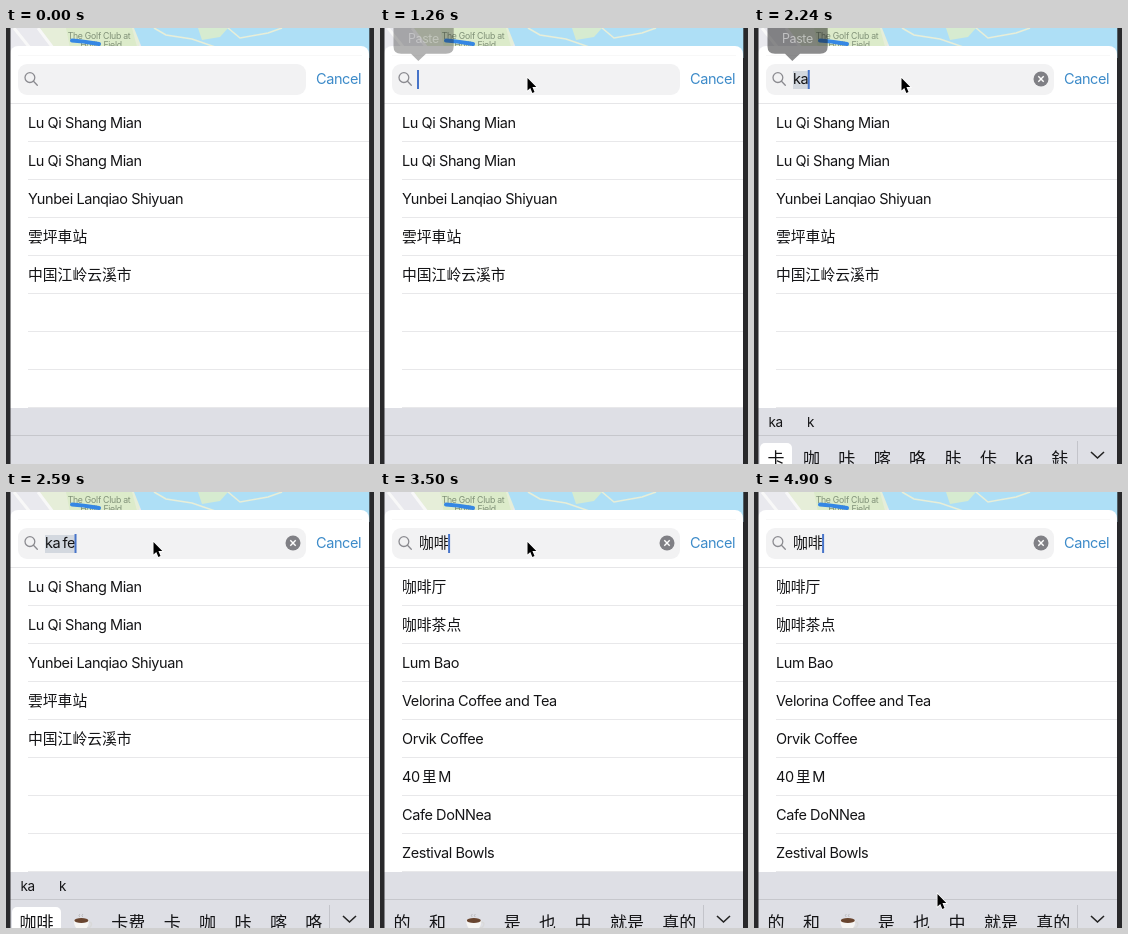
Recreate the animation shown at these times as an HTML page with a canvas. Size 368 by 436 pixels, loop 4970 ms.

```html
<!DOCTYPE html>
<html lang="zh">
<head>
<meta charset="utf-8">
<style>
  html, body { margin: 0; width: 368px; height: 436px; overflow: hidden; background: #fff; }
  canvas { display: block; }
</style>
</head>
<body>
<canvas id="stage" width="368" height="436"></canvas>
<script>
const g = document.getElementById('stage').getContext('2d');
const LOOP = 4970, STEP = 70;
const FONT = 'Inter, "Noto Sans CJK SC", "Noto Sans CJK", sans-serif';

const RECENT = ['Lu Qi Shang Mian', 'Lu Qi Shang Mian', 'Yunbei Lanqiao Shiyuan', '雲坪車站', '中国江岭云溪市'];
const RESULTS = ['咖啡厅', '咖啡茶点', 'Lum Bao', 'Velorina Coffee and Tea', 'Orvik Coffee',
  '40\u2009里\u2009M', 'Cafe DoNNea', 'Zestival Bowls'];

// [start, text, candidates]
const TYPING = [
  [0, '', ''],
  [2030, 'k', '看 可 开 快 卡 块 刻 k 靠'],
  [2170, 'ka', '卡 咖 咔 喀 咯 胩 佧 ka 鉲'],
  [2450, 'ka\u2009f', '咖啡 ☕ 卡 咖 咔 喀 咯 胩'],
  [2590, 'ka\u2009fe', '咖啡 ☕ 卡费 卡 咖 咔 喀 咯'],
  [2730, 'ka\u2009fei', '咖啡 ☕ 卡费 卡 咖 咔 喀 咯'],
  [3360, '咖啡', '的 和 ☕ 是 也 中 就是 真的']
];
const COMMIT = 3360, SHOW_RESULTS = 3500;

const POINTER_X = [[70, 178], [560, 160], [700, 156], [1050, 147], [4480, 147], [4900, 183]];
const POINTER_Y = [[70, 278], [560, 104], [700, 77], [910, 56], [1050, 50],
  [4480, 50], [4550, 72], [4690, 205], [4830, 378], [4900, 402]];
const CARET = [[0, 0], [140, 1], [700, 1], [840, 0], [1050, 0], [1190, 1], [1680, 1], [1820, 0],
  [1960, 0], [2030, 1], [3850, 1], [4060, 0], [4270, 0], [4410, 1]];
const PASTE = [[1190, 0], [1400, 1], [2170, 1], [2310, 0]];

function at(keys, t) {
  if (t <= keys[0][0]) return keys[0][1];
  for (let i = 1; i < keys.length; i++) {
    const [t0, a] = keys[i - 1], [t1, b] = keys[i];
    if (t <= t1) return a + (b - a) * (t - t0) / (t1 - t0);
  }
  return keys[keys.length - 1][1];
}

function rect(x, y, w, h, color, r = 0) {
  g.fillStyle = color;
  g.beginPath();
  g.roundRect(x, y, w, h, r);
  g.fill();
}

function line(path, color, width = 1) {
  g.strokeStyle = color;
  g.lineWidth = width;
  g.stroke(new Path2D(path));
}

function shape(path, color) {
  g.fillStyle = color;
  g.fill(new Path2D(path));
}

function setFont(text, size) {
  const cjk = text.charCodeAt(0) > 0x2e80;
  g.font = `${cjk ? size + 0.3 : size}px ${FONT}`;
  g.letterSpacing = cjk ? '0px' : `${-0.029 * size}px`;
}

function label(text, x, y, size = 14.5, color = '#141416') {
  setFont(text, size);
  g.fillStyle = color;
  g.fillText(text, x, y);
}

function drawMap() {
  rect(0, 0, 368, 30, '#e9e9ee');
  shape('M34 0H140L128 30H50Z', '#e6eed9');
  shape('M60 0H126L134 30H66Z', '#dcebca');
  line('M8 0L24 20M32 0L50 24', '#f8f8f8', 3);
  shape('M128 0H368V30H140Z', '#aedff6');
  shape('M192 0H222L214 9L196 12Z', '#d6ebd0');
  line('M148 0L160 7L186 11L212 20M222 0L234 10L262 5L276 0', '#e8eed8', 1.6);
  g.textAlign = 'center';
  label('The Golf Club at', 93, 10.5, 8.7, '#7f9077');
  label('Hollis Field', 95, 19.5, 8.7, '#7f9077');
  g.textAlign = 'left';
  g.lineCap = 'round';
  line('M66 12.5Q76 13 93 16', '#3587e4', 4);
  g.lineCap = 'butt';
}

function drawSearch(text, marked, caret) {
  rect(12, 36, 288, 31, '#f2f2f3', 9);
  g.lineCap = 'round';
  line('M28.8 49.6A4.9 4.9 0 1 1 19 49.6A4.9 4.9 0 1 1 28.8 49.6M27.5 53.3L31.3 57.2', '#8b8b90', 1.3);
  g.lineCap = 'butt';
  label('Cancel', 310, 55.5, 14.5, '#3d8bc9');
  setFont(text || 'k', 14.5);
  const width = g.measureText(text).width;
  if (marked) rect(39, 43, width, 18, '#d3d8df');
  label(text, 39, 55.5);
  if (text) {
    rect(279.5, 43.5, 15, 15, '#808085', 7.5);
    line('M284.3 48.3L289.7 53.7M289.7 48.3L284.3 53.7', '#fff', 1.4);
  }
  g.globalAlpha = caret;
  rect(text ? 38.5 + width : 37, 42, 2, 19, '#4774c9');
  g.globalAlpha = 1;
}

function drawList(rows) {
  line('M4 75.5H363', '#e6e6e8');
  for (let i = 0; i < 8; i++) {
    const y = 75.5 + 38 * i;
    if (rows[i]) label(rows[i], 22, y + 24.2);
    line(`M22 ${y + 38}H363`, '#e8e8ea');
  }
}

function drawCup(x) {
  line(`M${x + 16} 430q5 0 3 4q-1 2 -4 2`, '#d9d9d9', 1.5);
  shape(`M${x + 2} 428h15q0 10 -7.5 10t-7.5 -10Z`, '#f6f5f3');
  g.fillStyle = '#69452f';
  g.beginPath();
  g.ellipse(x + 9.5, 428.5, 7, 2.4, 0, 0, 7);
  g.fill();
  line(`M${x + 8} 425q-2 -1 0 -3M${x + 11} 425q-2 -1 0 -3`, '#bdbdc1');
}

function drawKeyboard(candidates, marked) {
  rect(4, 380, 359, 56, '#dedfe5');
  line('M4 407.5H363', '#c6c7cc');
  if (!candidates) return;
  if (marked) {
    label('ka', 14.5, 399, 13.5);
    label('k', 53, 399, 13.5);
  }
  let x = 13.5;
  candidates.split(' ').forEach((word, i) => {
    setFont(word, 16.7);
    const width = word === '☕' ? 21 : g.measureText(word).width;
    if (marked && i === 0) rect(x - 7.5, 415, width + 15, 30, '#fff', 5);
    if (word === '☕') drawCup(x);
    else label(word, x, 437, 16.7);
    x += width + 18.4;
  });
  line('M323.5 413V436', '#c3c4ca');
  line('M337 424L343.5 430L350 424', '#222', 1.6);
}

function drawPaste(alpha) {
  g.globalAlpha = alpha;
  shape('M13.5 0H73.7V18.5Q73.7 25.7 66 25.7H46L38.3 33L31 25.7H21Q13.5 25.7 13.5 18.5Z', '#1b1b1d');
  g.textAlign = 'center';
  label('Paste', 43.4, 15.2, 12.4, '#fff');
  g.textAlign = 'left';
  g.globalAlpha = 1;
}

function drawPointer(x, y) {
  g.save();
  g.translate(x + 0.5, y);
  g.scale(0.9, 0.93);
  const arrow = 'M0 0V13.5L3.1 10.7L5.4 16L7.8 15L5.5 9.8H9.8Z';
  line(arrow, '#fff', 1.6);
  shape(arrow, '#000');
  g.restore();
}

function draw(t) {
  const [, text, candidates] = TYPING.filter(s => s[0] <= t).pop();
  const marked = text !== '' && t < COMMIT;
  drawMap();
  rect(4, 18, 359, 420, '#fff', [8, 8, 0, 0]);
  line('M12 27.5H356', '#f8f8f8');
  drawSearch(text, marked, at(CARET, t));
  drawList(t < SHOW_RESULTS ? RECENT : RESULTS);
  drawKeyboard(candidates, marked);
  drawPaste(at(PASTE, t));
  rect(0, 0, 4.5, 436, '#29292b');
  rect(363.3, 0, 5, 436, '#29292b');
  if (t >= STEP) drawPointer(at(POINTER_X, t), at(POINTER_Y, t));
}

const start = performance.now();
function tick() {
  const t = (performance.now() - start) % LOOP;
  draw(Math.floor(t / STEP) * STEP);
  requestAnimationFrame(tick);
}
tick();
</script>
</body>
</html>
```
